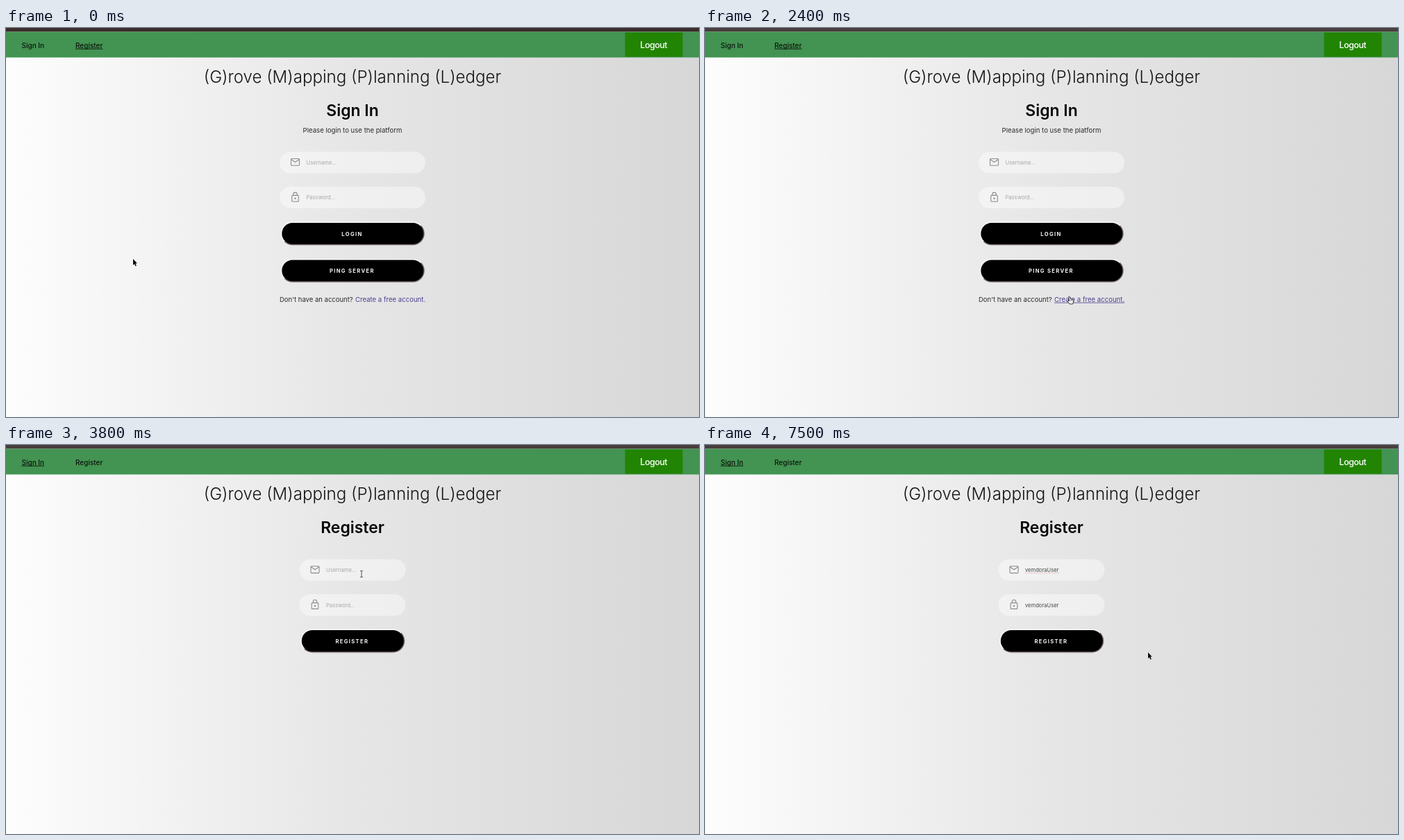
Write an HTML page with a canvas that moves like this. It is 998 by 561 pixels and loops after 8000 ms.

```html
<!DOCTYPE html>
<html lang="en">
<head>
<meta charset="utf-8">
<title>Sign in and register</title>
<style>
html, body { margin: 0; width: 100%; height: 100%; overflow: hidden; background: #e5e5e5; }
canvas { display: block; width: 998px; height: 561px; }
</style>
</head>
<body>
<canvas id="stage" width="998" height="561"></canvas>
<script>
const ctx = document.getElementById('stage').getContext('2d');
const W = 998, H = 561, LOOP = 8000, STEP = 100;
const USER = 'vemdoraUser';

// Pointer stops: time, x, y of the hot spot
const STOPS = [
  [400, 183, 333], [1300, 489, 393], [1500, 501.5, 388.5], [2200, 524.5, 387.5],
  [2900, 524.5, 387.5], [3200, 527.5, 283], [3800, 512, 186],
  [4900, 512, 186], [5200, 523.5, 231.5], [6100, 523.5, 231.5], [6700, 638, 299]
];

function pointerAt(t) {
  let a = STOPS[0];
  for (const b of STOPS) {
    if (t < b[0]) {
      const k = Math.max(0, (t - a[0]) / (b[0] - a[0] || 1));
      const e = k * k * (3 - 2 * k);
      return { x: a[1] + (b[1] - a[1]) * e, y: a[2] + (b[2] - a[2]) * e };
    }
    a = b;
  }
  return { x: a[1], y: a[2] };
}

const inside = (p, x, y, w, h) => p.x >= x && p.x <= x + w && p.y >= y && p.y <= y + h;

function rect(x, y, w, h, color) {
  ctx.fillStyle = color;
  ctx.fillRect(x, y, w, h);
}

function pill(x, y, w, h) {
  ctx.beginPath();
  ctx.roundRect(x, y, w, h, h / 2);
}

function text(str, x, y, size, { weight = 400, color = '#141414', align = 'left', gap = 0 } = {}) {
  ctx.font = `${weight} ${size}px Inter, "Open Sans", sans-serif`;
  ctx.letterSpacing = gap + 'px';
  ctx.textAlign = align;
  ctx.fillStyle = color;
  ctx.fillText(str, x, y);
  return ctx.measureText(str).width;
}

function polygon(points) {
  ctx.beginPath();
  points.forEach(([x, y]) => ctx.lineTo(x, y));
  ctx.closePath();
}

function background(barColor) {
  const g = ctx.createLinearGradient(0, 0, W, 0);
  g.addColorStop(0, '#fdfdfd');
  g.addColorStop(0.5, '#e6e6e6');
  g.addColorStop(1, '#d7d7d7');
  rect(0, 0, W, H, g);
  rect(0, 0, W, 5.5, barColor);
  rect(0, 5.5, W, 37, '#439352');
  rect(891.5, 6.5, 83, 35, '#228403');
}

function header(registering) {
  const nav = { weight: 500, color: '#0c160d' };
  const signWidth = text('Sign In', 22.5, 28.7, 10, nav);
  const regWidth = text('Register', 100, 28.7, 10, nav);
  if (registering) rect(22.5, 29.7, signWidth, 0.9, '#0c160d');
  else rect(100, 29.7, regWidth, 0.9, '#0c160d');
  text('Logout', 932.7, 28.6, 12.6, { weight: 500, color: '#fff', align: 'center', gap: -0.55 });
  text('(G)rove (M)apping (P)lanning (L)edger', 499, 78.8, 24.1, { weight: 300, align: 'center' });
  text(registering ? 'Register' : 'Sign In', 499, 126.8, 22.9, { weight: 600, color: '#060606', align: 'center' });
}

function mailIcon(x, y) {
  ctx.beginPath();
  ctx.roundRect(x - 6, y - 5, 12, 9.8, 1);
  ctx.moveTo(x - 5.4, y - 3.8);
  ctx.lineTo(x, y);
  ctx.lineTo(x + 5.4, y - 3.8);
  ctx.stroke();
}

function lockIcon(x, y) {
  ctx.beginPath();
  ctx.roundRect(x - 4.8, y - 2.6, 9.6, 8.8, 1);
  ctx.moveTo(x - 2.7, y - 2.6);
  ctx.lineTo(x - 2.7, y - 4.2);
  ctx.arc(x, y - 4.2, 2.7, Math.PI, 0);
  ctx.lineTo(x + 2.7, y - 2.6);
  ctx.stroke();
  ctx.beginPath();
  ctx.arc(x, y + 1.8, 1.2, 0, 7);
  ctx.fillStyle = '#8c8c8c';
  ctx.fill();
}

function field(x, y, w, icon, hint, value = '', caret = false) {
  pill(x, y, w, 31);
  ctx.fillStyle = 'rgba(255,255,255,.4)';
  ctx.fill();
  ctx.strokeStyle = '#8c8c8c';
  ctx.lineWidth = 1.1;
  icon(x + 22.5, y + 15);
  const tx = x + 38.5;
  const width = text(value || hint, tx, y + 18.4, 7.6, { color: value ? '#4a4a4a' : '#a9a9a9' });
  if (caret) rect(tx + (value ? width : 0), y + 10.5, 0.8, 9.5, '#555');
}

function button(x, y, w, label, hover) {
  const h = 33.8, m = h / 2;
  const corners = [[x + w - m, y + m], [x + m, y + m]];
  const edge = (color, ends) => {
    ctx.save();
    polygon([...ends, ...corners]);
    ctx.clip();
    pill(x, y, w, h);
    ctx.fillStyle = color;
    ctx.fill();
    ctx.restore();
  };
  edge('#f7f7f7', [[x - 1, y + h + 1], [x - 1, y - 1], [x + w + 1, y - 1]]);
  edge(hover ? '#5f6d66' : '#77696b', [[x - 1, y + h + 1], [x + w + 1, y + h + 1], [x + w + 1, y - 1]]);
  pill(x + 1.5, y + 1.5, w - 3, h - 3);
  ctx.fillStyle = hover ? '#03bf78' : '#000';
  ctx.fill();
  text(label, x + w / 2 - 0.9, y + 20.2, 7.6,
    { weight: hover ? 600 : 700, color: hover ? '#e2f8ee' : '#f4f4f4', align: 'center', gap: 1.35 });
}

function signInPage(overLink) {
  text('Please login to use the platform', 499, 150.6, 9.6, { color: '#2b2b2b', align: 'center' });
  field(394, 178.5, 210, mailIcon, 'Username...');
  field(394, 229, 210, lockIcon, 'Password...');
  button(395.8, 279.5, 207, 'LOGIN');
  button(395.8, 333, 207, 'PING SERVER');
  text("Don't have an account?", 394, 394.6, 9.5, { color: '#2b2b2b' });
  const width = text('Create a free account.', 503, 394.6, 9.6, { color: '#4c4190' });
  if (overLink) rect(503, 395.8, width, 0.8, '#4c4190');
}

const typed = (t, start, end) =>
  USER.slice(0, Math.max(0, Math.min(USER.length, Math.ceil((t - start + STEP) / (end - start + STEP) * USER.length))));

function registerPage(t, hover) {
  const name = typed(t, 4700, 5000), pass = typed(t, 6000, 6300);
  const nameCaret = t >= 4200 && t < 5400;
  const passCaret = t >= 5400 && t < 6500 || t >= 7000 && t < 7500;
  field(422.5, 164.8, 153, mailIcon, 'Username...', name, nameCaret);
  field(422.5, 215.2, 153, lockIcon, 'Password...', pass, passCaret);
  if (t >= 6000) {
    for (let x = 461; x < 510; x += 2) rect(x, 184.4, 1, 0.9, 'rgba(215,85,85,.5)');
  }
  button(424.3, 265.6, 150, 'REGISTER', hover);
}

function arrow() {
  polygon([[0, 0], [0, 9], [2, 7.2], [3.4, 10.4], [4.9, 9.7], [3.5, 6.6], [6, 6.4]]);
  ctx.strokeStyle = '#fff';
  ctx.lineWidth = 1;
  ctx.stroke();
  ctx.fillStyle = '#0a0a0a';
  ctx.fill();
}

function hand() {
  ctx.beginPath();
  ctx.moveTo(-1, 0.2);
  ctx.quadraticCurveTo(0, -1, 1, 0.2);
  ctx.lineTo(1.8, 3.2);
  ctx.lineTo(5.5, 4);
  ctx.quadraticCurveTo(6.6, 4.4, 6.2, 6.5);
  ctx.lineTo(5.2, 10.5);
  ctx.lineTo(0.6, 10.5);
  ctx.lineTo(-2.4, 6.6);
  ctx.quadraticCurveTo(-2.2, 5, 0.2, 6.4);
  ctx.closePath();
  ctx.fillStyle = '#fff';
  ctx.fill();
  ctx.strokeStyle = '#222';
  ctx.lineWidth = 0.9;
  ctx.stroke();
  ctx.beginPath();
  for (const x of [1.8, 3.3, 4.8]) {
    ctx.moveTo(x, 4.2);
    ctx.lineTo(x, 6);
  }
  ctx.lineWidth = 0.6;
  ctx.stroke();
}

function beam() {
  ctx.beginPath();
  ctx.moveTo(-2, -4.8);
  ctx.quadraticCurveTo(0, -4.8, 0, -3.4);
  ctx.quadraticCurveTo(0, -4.8, 2, -4.8);
  ctx.moveTo(0, -4);
  ctx.lineTo(0, 4);
  ctx.moveTo(-2, 4.8);
  ctx.quadraticCurveTo(0, 4.8, 0, 3.4);
  ctx.quadraticCurveTo(0, 4.8, 2, 4.8);
  ctx.strokeStyle = '#4a4a4a';
  ctx.lineWidth = 0.9;
  ctx.stroke();
}

function draw(t) {
  const registering = t >= 2500;
  const p = pointerAt(t);
  const overLink = !registering && inside(p, 503, 384, 101, 14);
  const overButton = registering && inside(p, 425, 267, 149, 32);
  const overInput = registering && (inside(p, 456, 165, 118, 31) || inside(p, 456, 215, 118, 31));

  background(t < 1800 ? '#3b2c2b' : '#483e3d');
  header(registering);
  if (registering) registerPage(t, overButton);
  else signInPage(overLink);

  // The hand stays after the page change until the pointer moves
  const waiting = registering && t < 3000;
  ctx.save();
  ctx.translate(p.x, p.y);
  if (overLink || overButton || waiting) hand();
  else if (overInput) beam();
  else arrow();
  ctx.restore();
}

const start = performance.now();
function tick() {
  const t = (performance.now() - start) % LOOP;
  draw(Math.floor(t / STEP) * STEP);
  requestAnimationFrame(tick);
}
tick();
</script>
</body>
</html>
```
